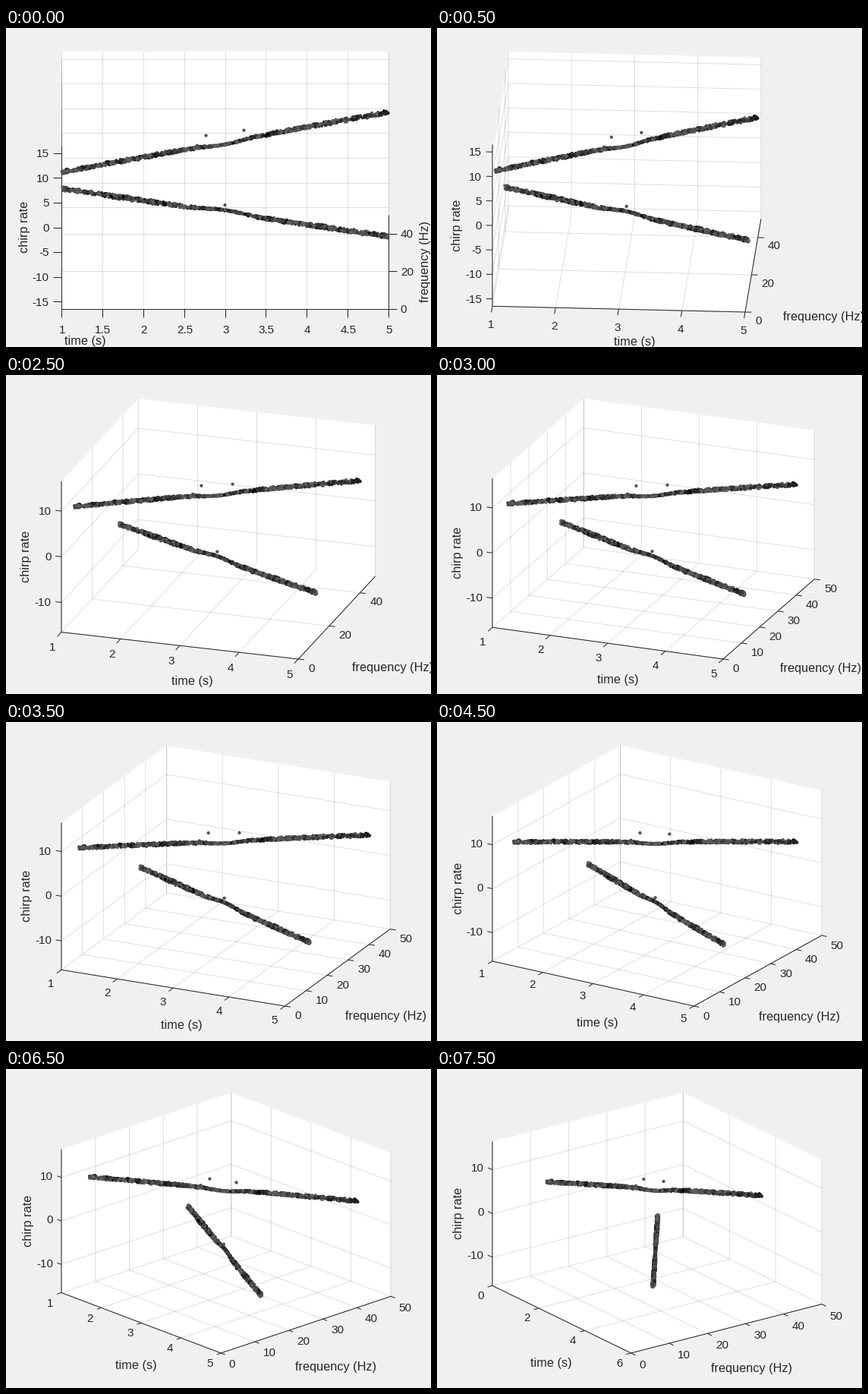
Recreate the animation shown at these times as a matplotlib script. Size 560x420 px, loop 8000 ms.

```python
import numpy as np
import matplotlib.pyplot as plt
from matplotlib.animation import FuncAnimation
from matplotlib.collections import LineCollection

W, H, DPI = 560, 420, 100
PX = 72 / DPI
STEPS, STEP_MS = 16, 500
AZ_STEP, ELEV = 3.6, np.radians(30)
INK, PAPER = "#262626", "#f0f0f0"
LEFT, TOP, F_MAX, Z_MAX = 73, 31, 50, 16.5

plt.rcParams["font.family"] = "Liberation Sans"
fig = plt.figure(figsize=(W / DPI, H / DPI), dpi=DPI, facecolor=PAPER)
ax = fig.add_axes([0, 0, 1, 1])


def chirp(rng, f0, rate, bump, n=900):
    """Noisy ridge of a linear chirp, bent and thinned where the two cross."""
    t = rng.uniform(1, 5, n)
    near = np.exp(-((t - 3) / 0.28) ** 2)
    spread = 0.33 * (1 - 0.65 * np.exp(-((t - 3) / 0.5) ** 2))
    f = f0 + rate * t + spread * rng.uniform(-1, 1, t.size)
    z = rate + bump * near + spread * rng.uniform(-1, 1, t.size)
    shade = rng.uniform(0.14, 0.42, 120)[((t - 1) * 29).astype(int)]
    grey = np.clip(shade + rng.uniform(-0.17, 0.13, t.size), 0, 0.37)
    return np.stack([t, f, z, grey])


def make_cloud():
    rng = np.random.default_rng(8)
    strays = np.array([(2.768, 22.9, 9.85, 0.33), (3.232, 25.3, 10.0, 0.33),
                       (3.0, 24.3, -4.75, 0.33), (2.66, 21.5, 8.35, 0.3)]).T
    return np.hstack([chirp(rng, 0.25, 8, -0.5),
                      chirp(rng, 43.6, -6.35, 0.5), strays])


CLOUD = make_cloud()


def unit(v):
    return v / np.hypot(*v)


class View:
    """Orthographic view of the axes box, stretched to fill its frame."""

    def __init__(self, k):
        az = np.radians(AZ_STEP * k)
        c, s = np.cos(az), np.sin(az)
        self.az, self.sin = az, s
        self.face_on = k == 0
        bottom = 370 if self.face_on else 374
        # The side title leaves less room at small turns.
        sx = 431 if self.face_on else min(434 / (c + s), 335 - 1.35 * k)
        sy = (bottom - TOP) / (np.cos(ELEV) + np.sin(ELEV) * (c + s))
        self.tv = np.array([sx * c, sy * s * np.sin(ELEV)])
        self.fv = np.array([sx * s, -sy * c * np.sin(ELEV)])
        self.zv = np.array([0, -sy * np.cos(ELEV)])
        self.origin = np.array([LEFT, bottom - self.tv[1]])

        self.t0, self.t1 = (0, 6) if k >= 15 else (1, 5)
        t_step = 2 if k >= 15 else 0.5 if self.face_on else 1
        self.t_ticks = np.arange(self.t0, self.t1 + 0.1, t_step)
        self.f_ticks = np.arange(0, F_MAX + 1, 10 if k >= 6 else 20)
        z_step = 5 if k < 2 else 10
        z_end = 15 // z_step * z_step
        self.z_ticks = np.arange(-z_end, z_end + 1, z_step)

        longest = max(np.hypot(*v) for v in (self.tv, self.fv, self.zv))
        self.tick_t = -0.025 * longest * unit(self.fv)
        self.tick_f = 0.025 * longest * unit(self.tv)

    def at(self, t, f, z):
        u = (np.asarray(t, float) - self.t0) / (self.t1 - self.t0)
        v = np.asarray(f, float) / F_MAX
        w = (np.asarray(z, float) + Z_MAX) / (2 * Z_MAX)
        return (self.origin + np.multiply.outer(u, self.tv)
                + np.multiply.outer(v, self.fv)
                + np.multiply.outer(w, self.zv))


def write(pos, text, size, **kw):
    kw = {"ha": "center", "va": "baseline", **kw}
    ax.text(*pos, text, fontsize=size * PX, color=INK,
            rotation_mode="anchor", zorder=5, **kw)


def number(pos, value, **kw):
    write(pos + np.array([0, 5.3]), f"{value:g}", 15.3, **kw)


def title(pos, text, **kw):
    write(pos, text, 16.3, **kw)


def draw_box(v):
    t0, t1, lo, hi = v.t0, v.t1, -Z_MAX, Z_MAX
    outline = [(t0, 0, lo), (t1, 0, lo), (t1, F_MAX, lo),
               (t1, F_MAX, hi), (t0, F_MAX, hi), (t0, 0, hi)]
    ax.fill(*np.array([v.at(*p) for p in outline]).T, color="white", lw=0,
            zorder=1)

    paths = [[(t, 0, lo), (t, F_MAX, lo), (t, F_MAX, hi)] for t in v.t_ticks]
    paths += [[(t1, f, lo), (t0, f, lo), (t0, f, hi)] for f in v.f_ticks]
    paths += [[(t0, 0, z), (t0, F_MAX, z), (t1, F_MAX, z)] for z in v.z_ticks]
    grid = [[v.at(*p) for p in path] for path in paths]
    ax.add_collection(LineCollection(grid, colors=INK, alpha=0.15,
                                     linewidths=PX, zorder=2))


def draw_axes(v):
    a, b = v.at(v.t0, 0, -Z_MAX), v.at(v.t1, 0, -Z_MAX)
    c, top = v.at(v.t1, F_MAX, -Z_MAX), v.at(v.t0, 0, Z_MAX)
    lines = [[top, a, b, c]]

    down, across = unit(v.tick_t), unit(v.tick_f)
    t_gap = np.array([10.5 * down[0] + 1, 9 + 6.5 * down[1]])
    f_gap = np.array([5, 0 if v.face_on else 10 + 11 * across[1]])
    z_gap = np.array([-5.5, 0])

    def ticks(values, place, step, gap, ha):
        for value in values:
            p = place(value)
            lines.append([p, p + step])
            number(p + step * [1, 1] + gap, value, ha=ha)

    ticks(v.t_ticks, lambda t: v.at(t, 0, -Z_MAX), v.tick_t, t_gap, "center")
    # Side numbers hang below the base of the tick, not its end.
    ticks(v.f_ticks, lambda f: v.at(v.t1, f, -Z_MAX), v.tick_f,
          f_gap - [0, v.tick_f[1]], "left")
    ticks(v.z_ticks, lambda z: v.at(v.t0, 0, z), -v.tick_f, z_gap, "right")
    ax.add_collection(LineCollection(lines, colors=INK, linewidths=PX,
                                     zorder=3))


def draw_titles(v):
    mid_t = v.origin + v.tv / 2
    mid_f = v.origin + v.tv + v.fv / 2
    mid_z = v.origin + v.zv / 2
    if v.face_on:
        title(mid_t + [-184, 46.5], "time (s)")
        title(mid_f + [53.5, 0], "frequency (Hz)", rotation=90)
    else:
        s2 = v.sin ** 2
        title(mid_t + [21 - 53 * s2, 46.5 + 17 * v.az], "time (s)")
        title(mid_f + [98.5 - 81 * v.sin, 72.5 - 23 * s2], "frequency (Hz)")
    title(mid_z + [-33.7 - v.tick_f[0], -0.5], "chirp rate", rotation=90)


def draw(k):
    ax.clear()
    ax.set(xlim=(0, W), ylim=(H, 0))
    ax.axis("off")
    v = View(k)
    draw_box(v)
    draw_axes(v)
    draw_titles(v)
    x, y = v.at(*CLOUD[:3]).T
    ax.scatter(x, y, s=(4.3 * PX) ** 2, c=CLOUD[3], cmap="gray", vmin=0,
               vmax=1, linewidths=0, zorder=4)
    return []


anim = FuncAnimation(fig, draw, frames=STEPS, init_func=lambda: [],
                     interval=STEP_MS, repeat=True, repeat_delay=0)
plt.show()
```
